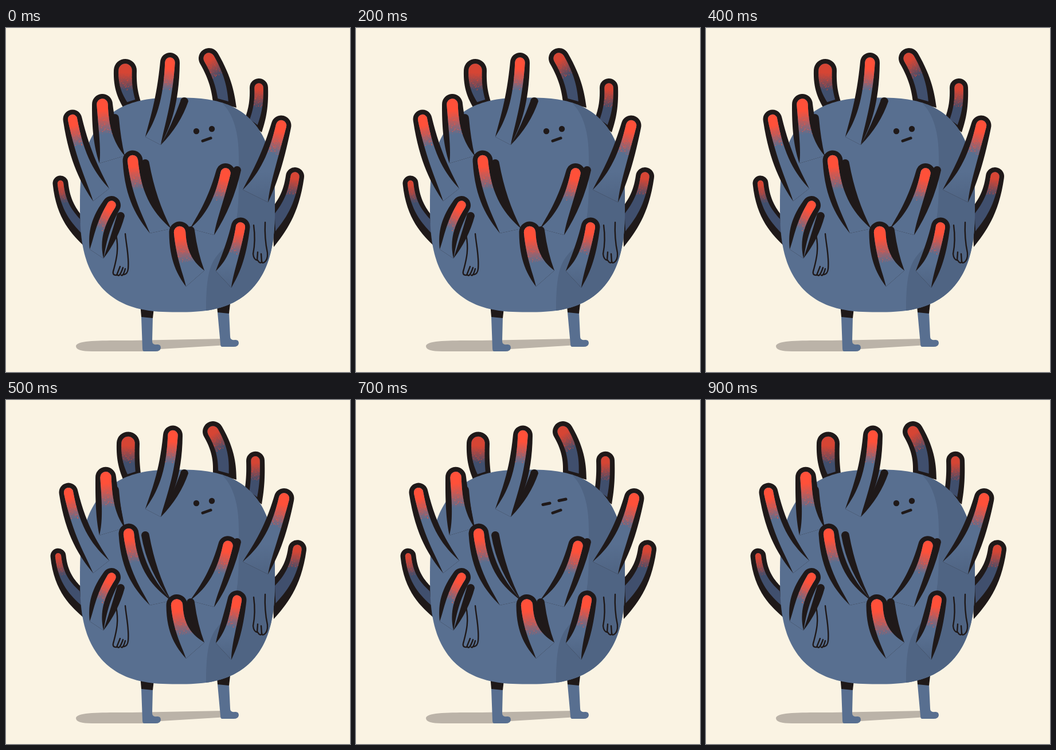
Recreate the animation shown at these times as an HTML page with a canvas. Size 600 by 600 pixels, loop 1000 ms.

```html
<!DOCTYPE html>
<html lang="en">
<head>
<meta charset="utf-8">
<title>Many-fingered creature</title>
<style>
html, body { margin: 0; width: 100%; height: 100%; overflow: hidden; background: #faf3e3; }
canvas { display: block; width: 100vmin; height: 100vmin; }
</style>
</head>
<body>
<canvas width="600" height="600"></canvas>
<script>
const c = document.querySelector('canvas').getContext('2d');
const INK = '#1f1919', BLUE = '#586f90', SHADE = '#4f6483', DARK = '#404f6d';
const RED = '255,80,57', DULL = '214,69,52';

function fill(path, color) { c.fillStyle = color; c.fill(path); }
function line(d, width) { c.lineWidth = width; c.stroke(new Path2D(d)); }
function dot(x, y, r) { c.beginPath(); c.arc(x, y, r, 0, 7); c.fill(); }
const mix = (a, b, t) => a.map((v, i) => v + (b[i] - v) * t);

function rng(seed) {
  return () => (seed = (seed * 16807) % 2147483647) / 2147483647;
}

// tip: centre of the rounded end; left, right: where the two sides run out
const finger = (tip, r, tilt, left, right, lean, thumb) =>
  ({ tip, r, tilt: tilt * Math.PI / 180, left, right, lean, thumb });

const back = [
  finger([208, 74], 20, 2, [204, 138], [235, 128], 5),
  finger([354, 53], 18, -30, [361, 128], [402, 139], 7),
  finger([441, 104], 16, -2, [416, 160], [446, 182], -6),
  finger([95, 271], 13.5, -6, [138, 382], [131, 326], -4),
  finger([504, 259], 16, 8, [464, 314], [467, 382], 4)
];

const front = [
  finger([286, 60], 17, 3, [243, 190], [270, 204], 5, [311, 128]),
  finger([168, 133], 18, -3, [163, 236], [207, 223], 6, [190, 157]),
  finger([116, 159], 16.5, -11, [152, 302], [180, 280], -7),
  finger([480, 170], 17.5, 14, [413, 282], [457, 304], 5),
  finger([184, 309], 16, 32, [146, 386], [170, 402], 0, [200, 328]),
  finger([221, 231], 17.5, -6, [251, 358], [288, 350], -7, [243, 236]),
  finger([383, 253], 17, 13, [321, 350], [363, 361], 4, [403, 248]),
  finger([303, 356], 18.5, -4, [314, 451], [346, 423], -5, [322, 353]),
  finger([409, 347], 16.5, 10, [366, 424], [393, 453], -6)
];

// Outline up the left side, round the tip and down the right; bulge widens the sides
function outline(tip, r, tilt, left, right, bulge1, bulge2) {
  const sin = Math.sin(tilt), cos = Math.cos(tilt);
  const side = (end, s) => {
    const out = n => [s * n * cos, s * n * sin];
    const add = (p, q) => [p[0] + q[0], p[1] + q[1]];
    const top = add(tip, out(r));
    const reach = Math.hypot(end[0] - top[0], end[1] - top[1]) / 2;
    const knee = add(top, [-sin * reach, cos * reach]);
    return [top, add(knee, out(bulge1)), add(mix(knee, end, 0.55), out(bulge2))];
  };
  const [a, a1, a2] = side(left, -1), [b, b1, b2] = side(right, 1);
  const path = new Path2D();
  path.moveTo(...left);
  path.bezierCurveTo(...a2, ...a1, ...a);
  path.arc(...tip, r, tilt + Math.PI, tilt);
  path.bezierCurveTo(...b1, ...b2, ...right);
  path.closePath();
  return path;
}

function drawThumb([x, y], [ex, ey]) {
  const mx = x + (ex - x) * 0.3, my = y + (ey - y) * 0.55;
  const path = new Path2D();
  path.arc(x, y, 7, Math.PI, 0);
  path.quadraticCurveTo(mx + 5, my, ex, ey);
  path.quadraticCurveTo(mx - 10, my, x - 7, y);
  fill(path, INK);
}

function drawFinger(f, swing, seed, isBack) {
  const { r, tilt, left, right } = f;
  const tip = [f.tip[0] + f.lean * swing, f.tip[1] + Math.abs(f.lean) * 0.3 * swing];
  const low = Math.max(left[1], right[1]), rgb = isBack ? DULL : RED;
  const lift = p => isBack ? mix(p, tip, 0.1) : p;
  const inset = isBack ? 0.25 : 0;
  const outer = outline(tip, r, tilt, left, right, isBack ? 0 : 3, isBack ? 0 : 3);
  const inner = outline(tip, r - 8.3, tilt, lift(mix(left, right, inset)), lift(mix(right, left, inset)),
    isBack ? 0 : -1, isBack ? 0 : -4);

  if (f.thumb) drawThumb(f.thumb, right);
  // Front fingers are open at the bottom, so their skin runs on into the body
  fill(outer, INK);
  const skin = c.createLinearGradient(0, tip[1], 0, low);
  skin.addColorStop(0.6, isBack ? DARK : BLUE);
  skin.addColorStop(1, isBack ? DARK : tip[0] > 400 ? SHADE : BLUE);
  fill(inner, skin);

  c.save();
  c.clip(inner);
  c.translate(...tip);
  c.rotate(tilt);
  const from = isBack ? 4 : 11, to = isBack ? 34 : r * 2.9;
  const glow = c.createLinearGradient(0, from, 0, to);
  glow.addColorStop(0, `rgb(${rgb})`);
  glow.addColorStop(0.45, `rgba(${rgb},.6)`);
  glow.addColorStop(1, `rgba(${rgb},0)`);
  c.fillStyle = glow;
  c.fillRect(-60, -30, 120, 30 + to);
  c.fillStyle = `rgb(${rgb})`;
  const rand = rng(seed * 977 + 31);
  for (let i = 0; i < r * 11; i++)
    dot((rand() - 0.5) * 3 * r, from + (to - from) * rand() ** 1.4, 0.3 + rand() * 0.5);
  c.restore();
}

// Superellipse
const body = new Path2D();
for (let a = 0; a < 2 * Math.PI; a += 0.03) {
  const pow = v => Math.sign(v) * Math.abs(v) ** (2 / 2.7);
  body.lineTo(299 + 170 * pow(Math.cos(a)), 308.5 + 187 * pow(Math.sin(a)));
}
const shadow = new Path2D('M122 555C122 544 170 545 220 545L380 542Q395 546 385 553L270 560L240 564H150Q122 564 122 555Z');
const shadeArea = new Path2D('M360 118C396 138 406 180 406 225C406 300 408 345 385 380C355 405 349 425 349 500H480V118Z');

function drawLeg(x, y, slant) {
  const foot = x + slant, ankle = foot + 17;
  fill(new Path2D(`M${x} ${y}H${x + 20}L${ankle} ${y + 42}Q${ankle} ${y + 49} ${ankle + 8} ${y + 48}
    Q${foot + 32} ${y + 47} ${foot + 32} ${y + 54}Q${foot + 31} ${y + 60} ${foot + 23} ${y + 60}H${foot + 3}
    Q${foot} ${y + 60} ${foot} ${y + 55}Z`), BLUE);
  fill(new Path2D(`M${x - 2} ${y - 24}H${x + 23}L${x + 20} ${y + 2}L${x} ${y}Z`), INK);
}

function drawArms() {
  line('M192 361C197 385 193 402 188 421Q184 432 193 431L199 416M195 431Q198 435 204 418M201 431Q204 434 208 420', 2.4);
  line('M208 359C210 380 215 400 213 420Q212 429 206 430', 2.4);
  line('M432 344C435 366 433 384 431 394Q432 404 438 405L439 391M439 405Q443 412 446 408L445 394', 2.4);
  line('M452 339C451 360 453 378 456 392Q457 405 450 409Q446 411 446 406', 2.4);
}

function drawFace(blink) {
  if (blink) {
    line('M326 182.500L338 180M354 175.500L366 173', 5);
  } else {
    c.fillStyle = INK;
    dot(332, 180, 5.2);
    dot(359, 176, 5.2);
  }
  line('M343 197L357 192', 5);
}

function draw(step) {
  const swing = step % 2, blink = step >= 6 && step < 9;
  c.fillStyle = '#faf3e3';
  c.fillRect(0, 0, 600, 600);
  c.strokeStyle = INK;
  c.lineCap = c.lineJoin = 'round';
  fill(shadow, '#bbb3a8');
  drawLeg(236, 504, 2);
  drawLeg(369, 496, 5);
  back.forEach((f, i) => drawFinger(f, swing, i + 1, true));
  fill(body, BLUE);
  c.save();
  c.clip(body);
  fill(shadeArea, SHADE);
  c.restore();
  front.forEach((f, i) => drawFinger(f, swing, i + 20, false));
  drawArms();
  drawFace(blink);
}

let shown = -1;
const start = performance.now();
function tick() {
  const step = Math.floor((performance.now() - start) % 1000 / 100);
  if (step !== shown) draw(shown = step);
  requestAnimationFrame(tick);
}
tick();
</script>
</body>
</html>
```
